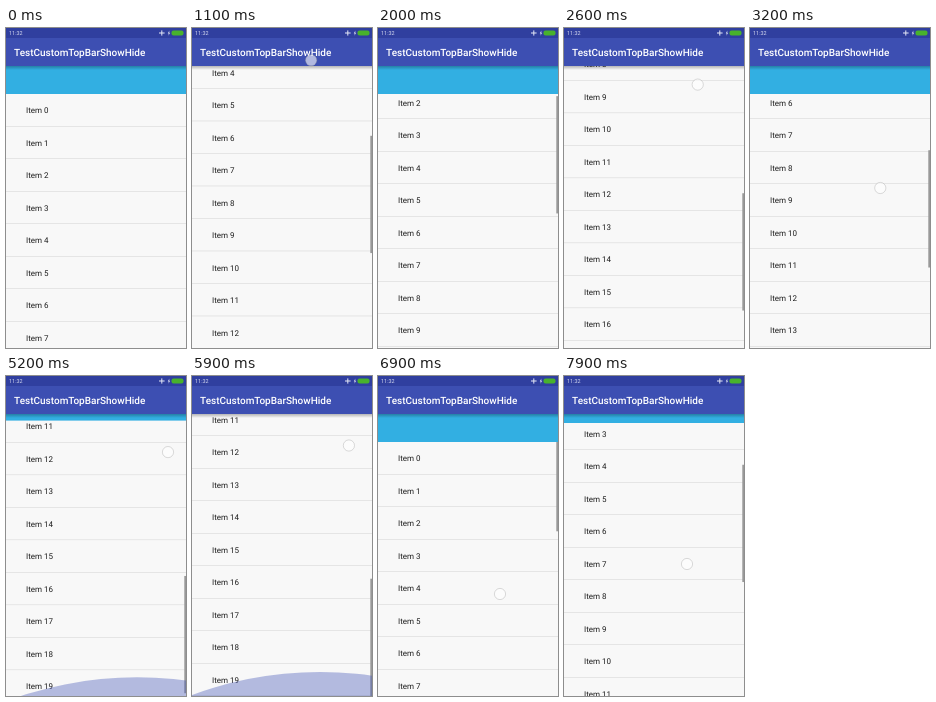
An HTML page with a canvas that plays this animation: 180 px wide and 320 px high, repeating every 8 s.

```html
<!DOCTYPE html>
<html lang="en">
<head>
<meta charset="utf-8">
<title>Top bar show and hide</title>
<style>
html, body { margin: 0; width: 100%; height: 100%; overflow: hidden; background: #f8f8f8; }
canvas { display: block; width: 180px; height: 320px; }
</style>
</head>
<body>
<canvas id="stage"></canvas>
<script>
const W = 180, H = 320, LOOP = 8000, STEP = 100;
const APP_BOTTOM = 38, BAR = 28, ROW = 32.5, COUNT = 20;
const LIST_TOP = APP_BOTTOM + BAR;
const VIEW = H - APP_BOTTOM, CONTENT = BAR + ROW * COUNT;
const END = CONTENT - VIEW;
const FONT = 'Roboto, sans-serif';

// Resting points of the scroll, eased in between
const stops = [
  { t: 400, s: 0 }, { t: 1300, s: 192 }, { t: 2000, s: 72.5 }, { t: 2200, s: 72.5 },
  { t: 2700, s: 333 }, { t: 3200, s: 202.5 }, { t: 4000, s: 202.5 }, { t: 4300, s: END },
  { t: 5900, s: END }, { t: 6650, s: 0 }, { t: 7100, s: 0 }, { t: 7600, s: 131 }, { t: 7900, s: 122 }
];

// While touching, the finger moves with the list: y = grip - scroll
const touches = [
  { from: 500, to: 1900, grip: 200, x0: 120, x1: 118 },
  { from: 2200, to: 3950, grip: 362.5, x0: 136, x1: 126 },
  { from: 4100, to: 6300, grip: 465.5, x0: 170, x1: 154 },
  { from: 6700, to: 6900, grip: 218, x0: 122, x1: 122 },
  { from: 7000, to: 7900, grip: 310, x0: 122, x1: 123 }
];

const canvas = document.getElementById('stage');
const ctx = canvas.getContext('2d');
const dpr = window.devicePixelRatio || 1;
canvas.width = W * dpr;
canvas.height = H * dpr;
ctx.scale(dpr, dpr);
ctx.textRendering = 'geometricPrecision';

const clamp = (v, lo, hi) => Math.min(hi, Math.max(lo, v));
const mix = (a, b, p) => a + (b - a) * p;
const ease = p => p * p * (3 - 2 * p);

// Short drags back and forth, one every 800 ms
function wiggle(t, from, to, size) {
  return t > from && t < to ? size * Math.sin(Math.PI * (t - from) / 800) ** 2 : 0;
}

function scrollAt(t) {
  const i = stops.findIndex(k => t <= k.t);
  if (i <= 0) return stops[i ? stops.length - 1 : 0].s;
  const a = stops[i - 1], b = stops[i];
  return mix(a.s, b.s, ease((t - a.t) / (b.t - a.t)))
    + wiggle(t, 3200, 4000, 20) - wiggle(t, 4300, 5900, 45);
}

// The bar hides while scrolling down and returns while scrolling up.
function barHeight(t) {
  let h = BAR;
  for (let u = STEP; u <= t; u += STEP) {
    h = clamp(h - scrollAt(u) + scrollAt(u - STEP), 0, BAR);
  }
  return h;
}

function fingerAt(t, scroll) {
  const k = touches.find(k => t >= k.from && t <= k.to);
  return k && { x: mix(k.x0, k.x1, (t - k.from) / (k.to - k.from)), y: k.grip - scroll };
}

function rect(x, y, w, h, color) {
  ctx.fillStyle = color;
  ctx.fillRect(x, y, w, h);
}

function text(str, x, y, font, color) {
  ctx.font = font + ' ' + FONT;
  ctx.fillStyle = color;
  ctx.fillText(str, x, y);
}

function drawList(scroll) {
  for (let i = 0; i < COUNT; i++) {
    const y = LIST_TOP + i * ROW - scroll;
    if (y > H || y + ROW < APP_BOTTOM) continue;
    text('Item ' + i, 20, y + 19.4, '8px', '#1c1c1c');
    rect(0, y + ROW - 0.5, W, 0.5, 'rgba(0,0,0,0.16)');
  }
}

function drawGlow(scroll, finger) {
  const amount = 1 - (END - scroll) / 30;
  if (amount <= 0 || !finger) return;
  const r = 370, x = mix(W / 2, finger.x, 0.57);
  ctx.fillStyle = `rgba(63,81,181,${0.373 * Math.min(1, amount * 1.5)})`;
  ctx.beginPath();
  ctx.arc(x, H - 24 * amount + r, r, 0, Math.PI * 2);
  ctx.fill();
}

function drawThumb(scroll) {
  const k = VIEW / CONTENT;
  rect(178.3, APP_BOTTOM + scroll * k, 1.7, VIEW * k, '#999');
}

function drawStatus() {
  rect(0, 0, W, 10, '#303f9f');
  text('11:32', 3, 7.3, '5.5px', '#d5d9ef');

  // Plane
  const white = '#e4e7f5';
  rect(153, 4.5, 5.6, 1, white);
  rect(155.3, 2.4, 1, 5.2, white);

  // Charging bolt
  ctx.fillStyle = white;
  ctx.beginPath();
  ctx.moveTo(163.4, 2.5);
  ctx.lineTo(161.8, 5.4);
  ctx.lineTo(162.9, 5.4);
  ctx.lineTo(162.4, 7.8);
  ctx.lineTo(164.1, 4.7);
  ctx.lineTo(163.1, 4.7);
  ctx.fill();

  // Battery
  ctx.fillStyle = '#48b22c';
  ctx.beginPath();
  ctx.roundRect(165.5, 2.5, 12, 5, 2);
  ctx.fill();
}

function drawAppBar() {
  const shade = ctx.createLinearGradient(0, APP_BOTTOM, 0, APP_BOTTOM + 4);
  shade.addColorStop(0, 'rgba(0,0,0,0.27)');
  shade.addColorStop(1, 'rgba(0,0,0,0)');
  rect(0, APP_BOTTOM, W, 4, shade);
  rect(0, 10, W, APP_BOTTOM - 10, '#3d4fb2');
  text('TestCustomTopBarShowHide', 8, 27.7, '500 10px', '#fff');
}

function drawFinger(p) {
  if (!p) return;
  ctx.beginPath();
  ctx.arc(p.x, p.y, 5.6, 0, Math.PI * 2);
  ctx.fillStyle = 'rgba(255,255,255,0.6)';
  ctx.fill();
  ctx.lineWidth = 0.8;
  ctx.strokeStyle = 'rgba(150,150,150,0.42)';
  ctx.stroke();
}

function draw(t) {
  const scroll = scrollAt(t);
  const finger = fingerAt(t, scroll);
  rect(0, 0, W, H, '#f8f8f8');
  drawList(scroll);
  if (t >= 500) drawThumb(scroll);
  drawGlow(scroll, finger);
  rect(0, APP_BOTTOM, W, barHeight(t), '#32afe2');
  drawAppBar();
  drawStatus();
  drawFinger(finger);
}

const start = performance.now();
function tick() {
  const t = (performance.now() - start) % LOOP;
  draw(Math.floor(t / STEP) * STEP);
  requestAnimationFrame(tick);
}
tick();
</script>
</body>
</html>
```
